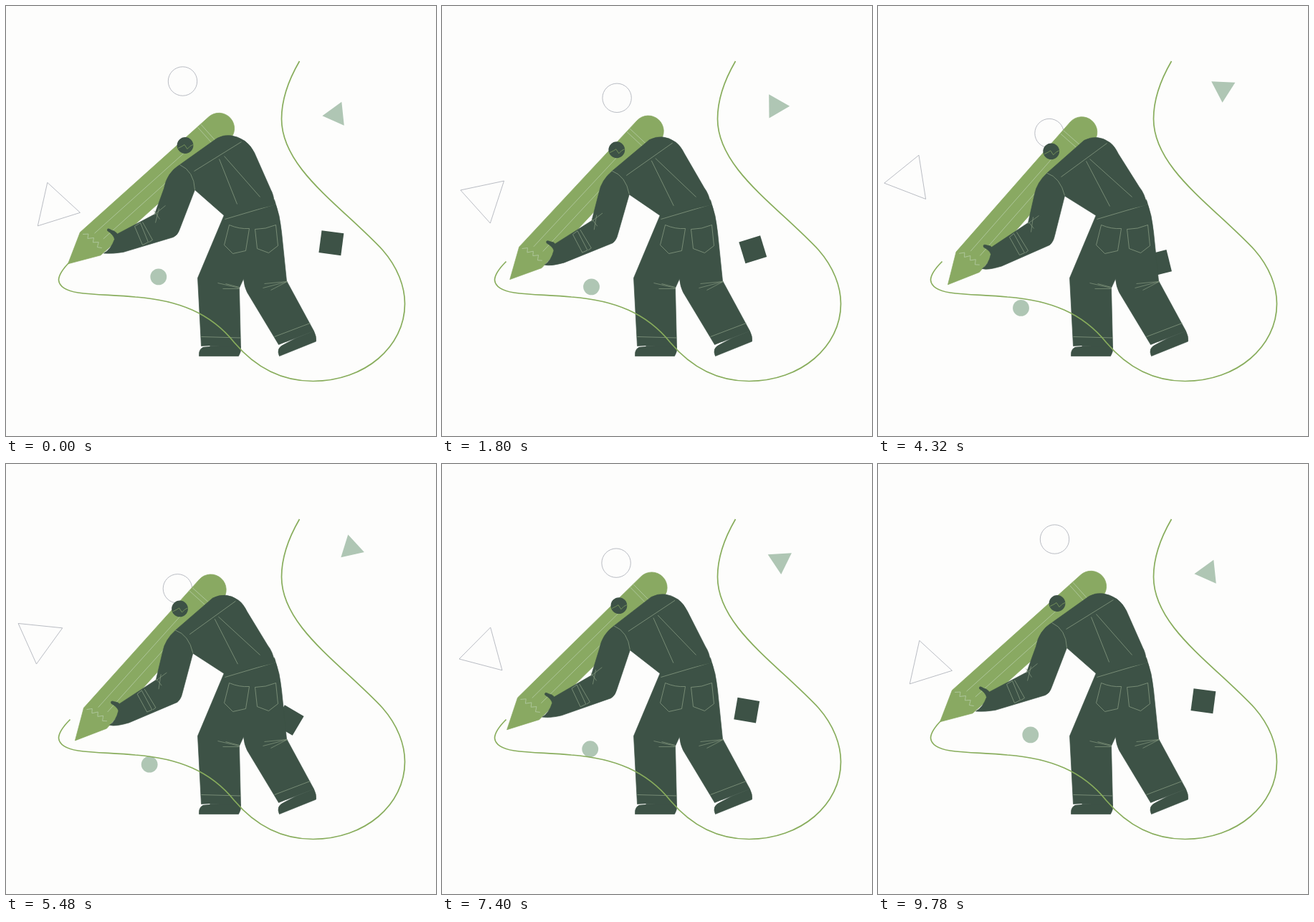
Write an HTML page with a canvas that moves like this. It is 600 px wide and 600 px high and loops after 9.88 s.

```html
<!DOCTYPE html>
<html lang="en">
<head>
<meta charset="utf-8">
<title>Pencil and line</title>
<style>
html, body { margin: 0; width: 100%; height: 100%; overflow: hidden; background: #fdfdfc; }
canvas { display: block; width: 100vmin; height: 100vmin; }
</style>
</head>
<body>
<canvas id="stage" width="600" height="600"></canvas>
<script>
const ctx = document.getElementById('stage').getContext('2d');
const LOOP = 9880, LAST = 209;
const PAPER = '#fdfdfc', DARK = '#3d5246', GREEN = '#89a962', PALE = '#afc6b4',
      STITCH = '#869a80', CHALK = '#b3caa2', THREAD = '#88ad5c', HAIR = '#a8abb4';

const clamp = x => Math.min(1, Math.max(0, x));
const ease = x => (1 - Math.cos(Math.PI * clamp(x))) / 2;
const mix = (a, b, k) => a + (b - a) * k;

// Steps hold for 20, 20 and 100 ms in turn.
function stepAt(time) {
  const s = time + 20, r = s % 140;
  return Math.min(LAST, Math.floor(s / 140) * 3 + (r < 20 ? 0 : r < 40 ? 1 : 2) - 1);
}

// Filled shapes get a thin rim of their own colour.
function fill(path, color) {
  ctx.fillStyle = color;
  ctx.fill(new Path2D(path));
  stroke(path, color, 0.7);
}

function stroke(path, color, width) {
  ctx.strokeStyle = color;
  ctx.lineWidth = width;
  ctx.stroke(new Path2D(path));
}

function disc(x, y, r, color, outlined) {
  ctx.beginPath();
  ctx.arc(x, y, r, 0, Math.PI * 2);
  ink(color, outlined);
}

function ink(color, outlined) {
  ctx.fillStyle = ctx.strokeStyle = color;
  ctx.lineWidth = 0.8;
  if (outlined) ctx.stroke(); else ctx.fill();
}

function polygon(x, y, r, sides, degrees, color, outlined) {
  ctx.beginPath();
  for (let i = 0; i < sides; i++) {
    const a = degrees * Math.PI / 180 + i * 2 * Math.PI / sides;
    ctx.lineTo(x + r * Math.cos(a), y + r * Math.sin(a));
  }
  ctx.closePath();
  ink(color, outlined);
}

// Path whose points blend between two poses: "x,y>x,y" moves, "x,y" stays.
function pose(text, k) {
  return text.replace(/([\d.]+),([\d.]+)>([\d.]+),([\d.]+)/g,
    (_, x0, y0, x1, y1) => mix(+x0, +x1, k) + ',' + mix(+y0, +y1, k));
}

function drawFloaters(step) {
  const k = step < 100 ? ease(step / 100) : 1 - ease((step - 100) / 109);
  const turn = 360 * step / LAST, angle = turn * Math.PI / 180;
  // the triangles turn about a point just above their centres
  const swayX = -Math.sin(angle), swayY = Math.cos(angle) - 1;
  disc(246 - 7.6 * k, 104.5 + 73.7 * k, 20.2, HAIR, true);
  disc(212.3 - 13.5 * k, 377.4 + 44.2 * k, 11.4, PALE);
  polygon(68 - 24.4 * k + swayX, 280 - 37.6 * k + swayY, 35.8, 3, 12.6 + turn, HAIR, true);
  polygon(460 + 21.8 * k + 1.6 * swayX, 150.8 - 33.2 * k + 1.6 * swayY, 19.2, 3, 54 + turn, PALE);
  polygon(453.4 - 63.8 * k, 330.2 + 28.7 * k, 22, 4, 52.5 + turn, DARK);
}

function drawLegs() {
  fill('M304,291 L267,379 L272,474 L327,475 L325,393 L331,380 Q332,391 336,399 L380,472 L429,453 L391,383 L384,315 Q382,292 374,270 Z', DARK);
  fill('M269,488 Q268,475 280,474.5 L327,474.5 Q328,482 324,488 Z', DARK);
  fill('M381,488 Q376,477 387,472 L404,463 L429,453 Q433,461 432,467.5 Z', DARK);
  stroke('M271,475 L284,474 M381,472.8 L390,469', PAPER, 1);
  stroke('M304,291 L374,271 M305,297 L376,276', STITCH, 0.8);
  stroke('M311,305 Q325,311 339,310 L334,341 L316,345 L304,333 Z', STITCH, 0.8);
  stroke('M347,311 Q362,311 376,305 L379,334 L366,344 L350,338 Z', STITCH, 0.8);
  stroke('M295,386 L325,393 M302,394 L325,394 M306,387 L325,392 M392,384 L358,393 M392,384 L369,396 M391,384 L360,387', STITCH, 0.7);
  stroke('M272,461 L327,462.5 M374,461 L424,442', STITCH, 0.8);
}

function drawThread() {
  stroke('M409,76.5 C393,104 384,130 384,157 C384,226 467,278 525,340 C546,364 556,391 556,415 ' +
    'C556,475 500,523 428,523 C382,523 346,502 318,469 C285,428 240,410 180,405.5 ' +
    'C150,402.5 125,403 100,399.5 C84,397 74,391 73,382 C73,373 81,364 89,356', THREAD, 1.7);
}

function drawPencil(k) {
  ctx.save();
  ctx.translate(mix(86, 97, k), mix(359.3, 388.3, k));
  ctx.rotate(mix(-41.9, -48.7, k) * Math.PI / 180);
  fill('M0,0 L42,-21.5 L283,-21.5 A21.5,21.5 0 0 1 283,21.5 L42,21.5 Z', GREEN);
  stroke('M43,-17 L49,-12 L44,-8 L51,-3 L46,1 L52,6 L46,10 L50,15', CHALK, 0.8);
  stroke('M56,-7 L236,-7 M60,7 L200,7 M262,-21 L262,10 M268,-21 L268,10', CHALK, 0.8);
  ctx.restore();
}

function drawUpperBody(k) {
  const moving = text => pose(text, k);
  // torso
  fill(moving('M242,221>236,232 L294,184>287,187 Q312,174.5>306,177.5 333,188>323,190 ' +
    'Q341,194>329,194 346,204>335,206 L369,256>364,252 Q373,263>372,262 374,275 L375,277 L304,292 L263,256>260,264.5 Z'), DARK);
  // arm and hand
  fill(moving('M242,221>236,232 Q224,232>221,246 220,254>218,262 L207,290>209,302 L155,317.5>158,336 ' +
    'Q151,313>157,334 147,312.5>152,333.5 Q140,308>145,331 141,313>147,336 Q150,319>156,341 151,325>157,346 ' +
    'Q146,339>154,360 136,344.5>145,366 Q149,345.5>152,368.5 163,343>172,362.5 L233,322>239,333 ' +
    'Q239,319>244,329 241,313>246,320 L263,256>260,264.5 Q262,230>254,240 242,221>236,232 Z'), DARK);
  stroke(moving('M242,221>235,232.5 Q262,230>254,239 263,256>260,264'), STITCH, 0.8);
  stroke(moving('M262,230>255,238 L328,189>319,191 M297,213>290,216 L322,276>323,279 ' +
    'M304,209>295,213 L354,266>354,266'), STITCH, 0.8);
  stroke(moving('M222,278>224,292 L206,291>209,303 M213,282>216,294 L208,302>213,315 ' +
    'M206,285>209,300 L214,297>217,310'), STITCH, 0.7);
  stroke(moving('M179,307>183,322 L190,333>197,347 L198,329>204,344 L187,302>189,317 Z ' +
    'M190,301>193,315 L204,326>209,341 L199,329>205,344'), STITCH, 0.8);
  // head
  const x = mix(249.5, 241.2, k), y = mix(194, 202.3, k);
  disc(x, y, 11.4, DARK);
  ctx.save();
  ctx.translate(x, y);
  stroke('M-10,4 L-4,1 L-1,-1 L3,5 L7,1 L11,-1', GREEN, 0.7);
  ctx.restore();
}

function draw(now) {
  const step = stepAt(now % LOOP);
  const bend = step < 96 ? ease(step / 57) : 1 - ease((step - 96) / 107);
  ctx.fillStyle = PAPER;
  ctx.fillRect(0, 0, 600, 600);
  ctx.save();
  ctx.translate(0.5, 0.5);
  drawFloaters(step);
  drawLegs();
  drawThread();
  drawPencil(bend);
  drawUpperBody(bend);
  ctx.restore();
}

const start = performance.now();
function tick() {
  draw(performance.now() - start);
  requestAnimationFrame(tick);
}
tick();
</script>
</body>
</html>
```
